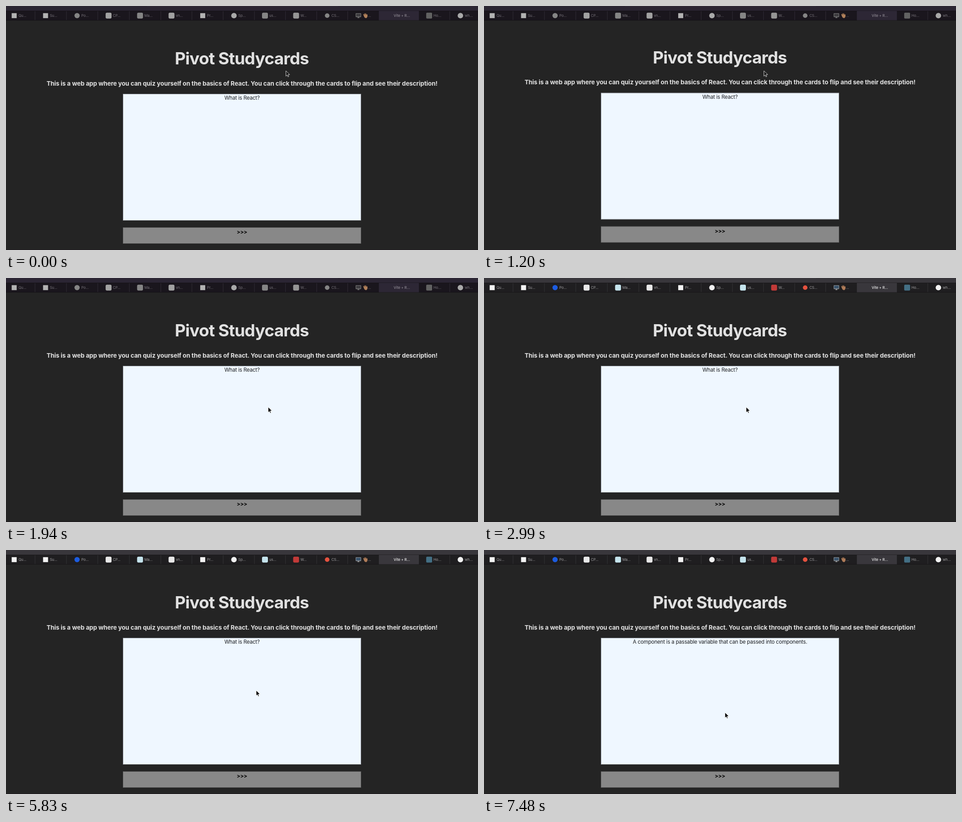
Animation, 1038 px wide and 539 px high, one loop 8000 ms. Source, as an HTML page:

```html
<!DOCTYPE html>
<html lang="en">
<head>
<meta charset="utf-8">
<title>Flashcards</title>
<style>
  html, body { margin: 0; width: 100%; height: 100%; overflow: hidden; background: #242424; }
  svg { display: block; width: 1038px; height: 539px; font-family: Inter, "Open Sans", sans-serif; }
  text { font-variant-ligatures: none; }
  .mid { text-anchor: middle; }
  .bold { font-weight: 700; fill: #e1e1e1; }
  .body { font-size: 11.53px; letter-spacing: -.2px; fill: #1b1d20; }
  .tab { font-size: 7.9px; letter-spacing: -.08px; }
</style>
</head>
<body>
<svg viewBox="0 0 1038 539">
  <rect width="1038" height="539" fill="#242424"/>
  <g id="bar"></g>
  <g id="page">
    <text class="mid bold" x="518.6" y="129" font-size="36.9" letter-spacing="-.8">Pivot Studycards</text>
    <text class="mid bold" x="519" y="175.5" font-size="13.48" letter-spacing="-.114">This is a web app where you can quiz yourself on the basics of React. You can click through the cards to flip and see their description!</text>
    <rect x="257.5" y="194.5" width="523" height="279" fill="#eff7ff" stroke="#92979c"/>
    <text id="card" class="mid body" x="519" y="207"></text>
    <rect x="257.5" y="489.5" width="523" height="35" fill="#888" stroke="#646464"/>
    <text class="mid body" x="519" y="503" style="font-weight:700;fill:#000">&gt;&gt;&gt;</text>
  </g>
  <rect y="538" width="1038" height="1" fill="#1f1b20"/>
  <path id="cursor" d="M0 0V11.8L2.7 9.3 4.5 13.3 6.3 12.5 4.6 8.6 8.3 8.3Z" stroke="#fff" stroke-width=".8" stroke-linejoin="round"/>
</svg>
<script>
const LOOP = 8000;
const NS = 'http://www.w3.org/2000/svg';
const $ = id => document.getElementById(id);

// Each themed shape stores two fills: window in the background, window focused.
const themed = [];
function add(tag, attrs, fills, text) {
  const el = document.createElementNS(NS, tag);
  for (const k in attrs) el.setAttribute(k, attrs[k]);
  if (text) el.textContent = text;
  $('bar').appendChild(el);
  themed.push([el, fills]);
}
const rect = (x, y, width, height, fills, rx = 0) => add('rect', { x, y, width, height, rx }, fills);
const path = (d, fills) => add('path', { d }, fills);

const icons = {
  page: { r: 0, size: 11, fills: ['#b3b3b3', '#f4f4f4'] },
  dot: { r: 6, size: 11.5, fills: ['#858585', '#1c5ce0'] },
  code: { r: 3, size: 13, fills: ['#a2a2a2', '#e9e9e9'] },
  atom: { r: 3, size: 13, fills: ['#858585', '#c5e4ed'] },
  find: { r: 6, size: 12, fills: ['#a9a9a9', '#f3f3f3'] },
  quiz: { r: 3, size: 13, fills: ['#959595', '#c23a38'] },
  star: { r: 5, size: 10, fills: ['#858585', '#e5523f'] },
  photo: { r: 2, size: 13, fills: ['#626262', '#436f84'] }
};
const tabs = [
  [18, 'page', 'Qu…'], [87, 'page', 'Su…'], [156.3, 'dot', 'Po…'], [225.6, 'code', 'CP…'],
  [294.8, 'atom', 'Ma…'], [364, 'code', 'vn…'], [432.6, 'page', 'Pr…'], [501.3, 'find', 'Sp…'],
  [569.5, 'atom', 'us…'], [638, 'quiz', 'W…'], [706.3, 'star', 'CS…'],
  [930.6, 'photo', 'Ho…'], [999.3, 'find', 'wh…']
];
const edges = [63.5, 132.5, 201.5, 270.8, 340, 408.5, 477, 545.8, 614.3, 682.8, 751.2, 975.5];

function buildBar() {
  rect(0, 0, 1038, 11, ['#2b2533', '#38363b']);
  rect(310, 0, 420, 1, ['#332d3b', '#3f3d42']);
  rect(0, 10.5, 1038, 21.5, ['#131015', '#161517']);
  rect(0, 11.5, 1038, 19.5, ['#1a161d', '#1f1e20']);
  for (const x of edges) rect(x, 11.5, .8, 19.5, ['#37323c', '#3b3a3d']);
  rect(820, 11, 88, 20.5, ['#2d2735', '#39373c']);
  for (const [x, kind, label] of tabs) {
    const { r, size, fills } = icons[kind];
    rect(x - size / 2, 21.3 - size / 2, size, size, fills, r);
    add('text', { class: 'tab', x: x + 9.4, y: 24.3 }, ['#77737a', '#a09fa1'], label);
  }
  add('text', { class: 'tab mid', x: 870.5, y: 24.3, 'font-weight': 500 }, ['#8d8891', '#eeeeee'], 'Vite + R…');
  // desktop computer and waving hand
  rect(769, 16, 12, 8.5, ['#777777', '#8e9297'], 1);
  rect(770, 17, 10, 6, ['#3e3c40', '#39536b']);
  path('M773.5 24.5h3l.8 2h-4.6z', ['#777777', '#a3a5a7']);
  path('M785.5 18.5l1.2-.7 2.2 2.1-1.3-3.2 1.2-.5 2 3-.6-3 1.2-.2 1.5 3.8.6-1.8 1.2.5.4 4.3-1.7 3.4-2.7.5-2.5-1.8z', ['#b1805a', '#b07c58']);
  add('text', { class: 'tab', x: 796, y: 24.3 }, ['#77737a', '#a09fa1'], '…');
}

// Keys hold until the next one, as the screen was sampled in steps.
const scroll = [[0, 0], [1050, -2], [1200, -2.4], [1500, -1], [1650, -.4], [1800, 0]];
const pointer = [
  [0, 615.6, 143.2], [1800, 598, 210], [1940, 576.6, 285.2],
  [3290, 569, 288], [3440, 558, 293], [3590, 552.6, 295.2],
  [5830, 550.2, 310.2], [5980, 549, 336], [6130, 543, 394], [6280, 533, 458],
  [6430, 525, 490], [6580, 521, 495], [6880, 522, 472], [7030, 527, 398], [7180, 530, 359]
];
const question = 'What is React?';
const cards = [
  [0, question],
  [3880, 'React is a javascript front-end library.'],
  [5080, question],
  [6730, 'What is a component?'],
  [7480, 'A component is a passable variable that can be passed into components.']
];
const focus = [[0, 0], [2990, 1]];
const at = (keys, t) => keys.findLast(k => k[0] <= t);

function draw(t) {
  const [, x, y] = at(pointer, t);
  $('cursor').setAttribute('transform', `translate(${x} ${y})`);
  $('cursor').setAttribute('fill', t < 1800 ? '#161616' : '#000');
  $('page').setAttribute('transform', `translate(0 ${at(scroll, t)[1]})`);
  $('card').textContent = at(cards, t)[1];
  const mode = at(focus, t)[1];
  for (const [el, fills] of themed) el.setAttribute('fill', fills[mode]);
}

buildBar();
draw(0);
const start = performance.now();
function tick() {
  draw((performance.now() - start) % LOOP);
  requestAnimationFrame(tick);
}
requestAnimationFrame(tick);
</script>
</body>
</html>
```
